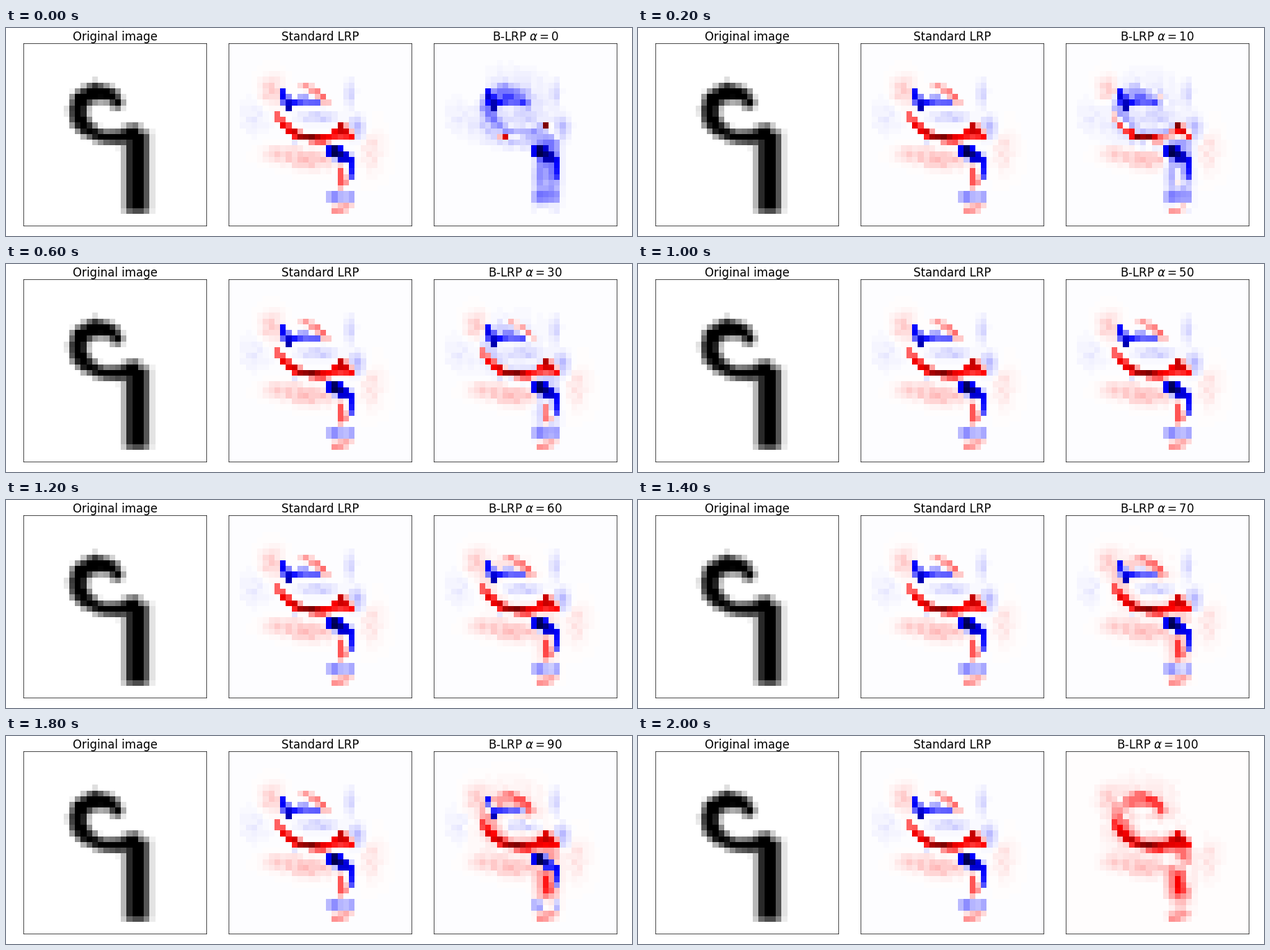
Animation, 900 px wide and 300 px high, one loop 2.1 s. Source, as a matplotlib script:

```python
import numpy as np
import matplotlib.pyplot as plt
from matplotlib.animation import FuncAnimation

N = 32
Z_MAX = 2.6
rng = np.random.default_rng(4)
rows, cols = np.mgrid[0:N, 0:N]


def stroke(points, soft):
    """Soft brush along (x, y, radius, value) points: coverage and value."""
    pts = np.array(points, float)
    t = np.linspace(0, len(pts) - 1, 30 * len(pts))
    x, y, r, v = (np.interp(t, range(len(pts)), p) for p in pts.T)
    d = np.hypot(cols[..., None] + 0.5 - x, rows[..., None] + 0.5 - y)
    depth = r - d
    return np.clip(depth.max(axis=-1) / soft, 0, 1), v[depth.argmax(axis=-1)]


def paint(grid, *points):
    cover, value = stroke(points, 0.5)
    return grid + cover * (value - grid)


def blob(cx, cy, sx, sy, amp):
    return amp * np.exp(-((cols - cx) / sx) ** 2 - ((rows - cy) / sy) ** 2)


def noise(low, high):
    return rng.uniform(low, high, (N, N))


# handwritten digit: a hook and an upright bar
hook = [(16.3, 10.5, 1.7, 1), (15.4, 9.2, 1.9, 1), (12.5, 8.6, 2.3, 1),
        (10, 10, 2.2, 1), (9.5, 11.8, 2.2, 1), (9.7, 13.4, 2.2, 1),
        (10.8, 14.9, 2, 1), (12.5, 16, 1.8, 1), (14.5, 16.6, 1.8, 1),
        (17, 16.6, 2, 1), (19.2, 15.9, 2.2, 1)]
across = np.clip((2.85 - np.abs(cols + 0.5 - 19.85)) / 1.8, 0, 1)
along = np.clip(rows - 14.5, 0, 1) * np.clip(29.7 - rows, 0, 1)
ink = np.maximum(stroke(hook, 1.5)[0], across * along)

# mean relevance: faint surroundings, then signed strokes
mu = (blob(9, 19, 3, 1.3, 0.1) + blob(14, 20.2, 3.5, 1.4, 0.13)
      + blob(7, 8, 2, 2.5, 0.08) + blob(24.5, 18.5, 2, 3.5, 0.05)
      + blob(22, 14.5, 1.3, 2, -0.12) + blob(15, 12.6, 3, 1, -0.09)
      + blob(4, 12.5, 2.5, 3, -0.03) + blob(20.6, 8.5, 0.9, 2.3, -0.07)
      + blob(11, 17, 0.4, 0.4, -0.08))
mu = mu * noise(0.6, 1.4) - 0.001

mu = paint(mu, (8.5, 12.3, .75, .25), (9.1, 13.8, .8, .48),
           (10.6, 15.3, .85, .5), (12.5, 16.4, .9, .75), (14.5, 16.7, .9, .9),
           (16.5, 16.9, .9, .5), (20.5, 16.5, .6, .3))
mu = paint(mu, (18.5, 15.6, .7, .45), (19.6, 15, 1.1, .65),
           (21.3, 16.2, .8, .5))
mu = paint(mu, (13, 7.6, .7, .18), (15, 8.3, .8, .2), (17, 10.2, .75, .28))
mu = paint(mu, (11.4, 10.6, .8, -.45), (13, 10.1, 1, -.27),
           (15.5, 10.5, .7, -.3))
mu = paint(mu, (9.4, 8.4, .75, -.45), (9.9, 9.8, .9, -.5),
           (10.6, 11.5, .9, -.68))
mu = paint(mu, (17.5, 18.9, .9, -.5), (18.8, 19.3, 1.3, -1),
           (19.8, 19.9, 1.1, -.65), (21.3, 20.2, .8, -.5),
           (21.5, 23.2, .7, -.4))
mu = paint(mu, (19.5, 22.4, 1, .3), (19.7, 24.6, 1.1, .3))
mu = paint(mu, (17.5, 27, .9, -.16), (18.6, 27, .9, -.27),
           (20, 27, .9, -.12), (21.5, 27, .9, -.2))
mu = paint(mu, (18.8, 29.2, .9, .2), (21, 28.8, .8, .16))

# spread: follows the ink, with a faint halo, and can turn any cell's sign
taper = np.clip((31 - rows) / 8, 0.3, 1)
halo = stroke([(x, y, 7, 1) for x, y, *_ in hook] + [(19.8, 22, 5, 1)], 7)[0]
sigma = np.maximum(ink * (0.2 + 0.18 * np.abs(mu)) * taper,
                   0.07 * halo ** 1.5 * noise(0.4, 1) * taper)
sigma = np.maximum(sigma, np.abs(mu) * 1.05 / Z_MAX)
# two spots that stay certain
sigma *= 1 - blob(11.7, 16.5, 0.9, 0.8, 0.4) - blob(19, 14, 0.5, 0.5, 0.4)


def balance(rel):
    """Scale each sign to its own extreme."""
    return np.where(rel > 0, rel / max(rel.max(), 1e-9),
                    rel / max(-rel.min(), 1e-9))


def quantile(alpha):
    p = alpha / 100
    z = np.log((p + 1e-3) / (1 - p + 1e-3)) / 1.7
    return balance(mu + np.clip(z, -Z_MAX, Z_MAX) * sigma)


fig = plt.figure(figsize=(9, 3), dpi=100, facecolor="white")
LEFT, TOP, SIDE, PITCH = 25, 22, 263.1, 295.1


def panel(k, data, title, cmap, low):
    ax = fig.add_axes([(LEFT + k * PITCH) / 900, 1 - (TOP + SIDE) / 300,
                       SIDE / 900, SIDE / 300])
    im = ax.imshow(data, cmap=cmap, vmin=low, vmax=1, aspect="auto",
                   interpolation="nearest")
    ax.set_xticks([])
    ax.set_yticks([])
    for spine in ax.spines.values():
        spine.set_linewidth(0.5)
    return im, ax.set_title(title, fontsize=12, pad=3, fontfamily="DejaVu Sans")


panel(0, ink, "Original image", "gray_r", 0)
panel(1, balance(mu), "Standard LRP", "seismic", -1)
heat, label = panel(2, quantile(0), "", "seismic", -1)


def update(i):
    alpha = 5 * i
    heat.set_data(quantile(alpha))
    label.set_text(rf"B-LRP $\alpha={alpha}$")
    return heat, label


anim = FuncAnimation(fig, update, frames=21, interval=100, repeat=True,
                     repeat_delay=0, blit=False)
plt.show()
```
